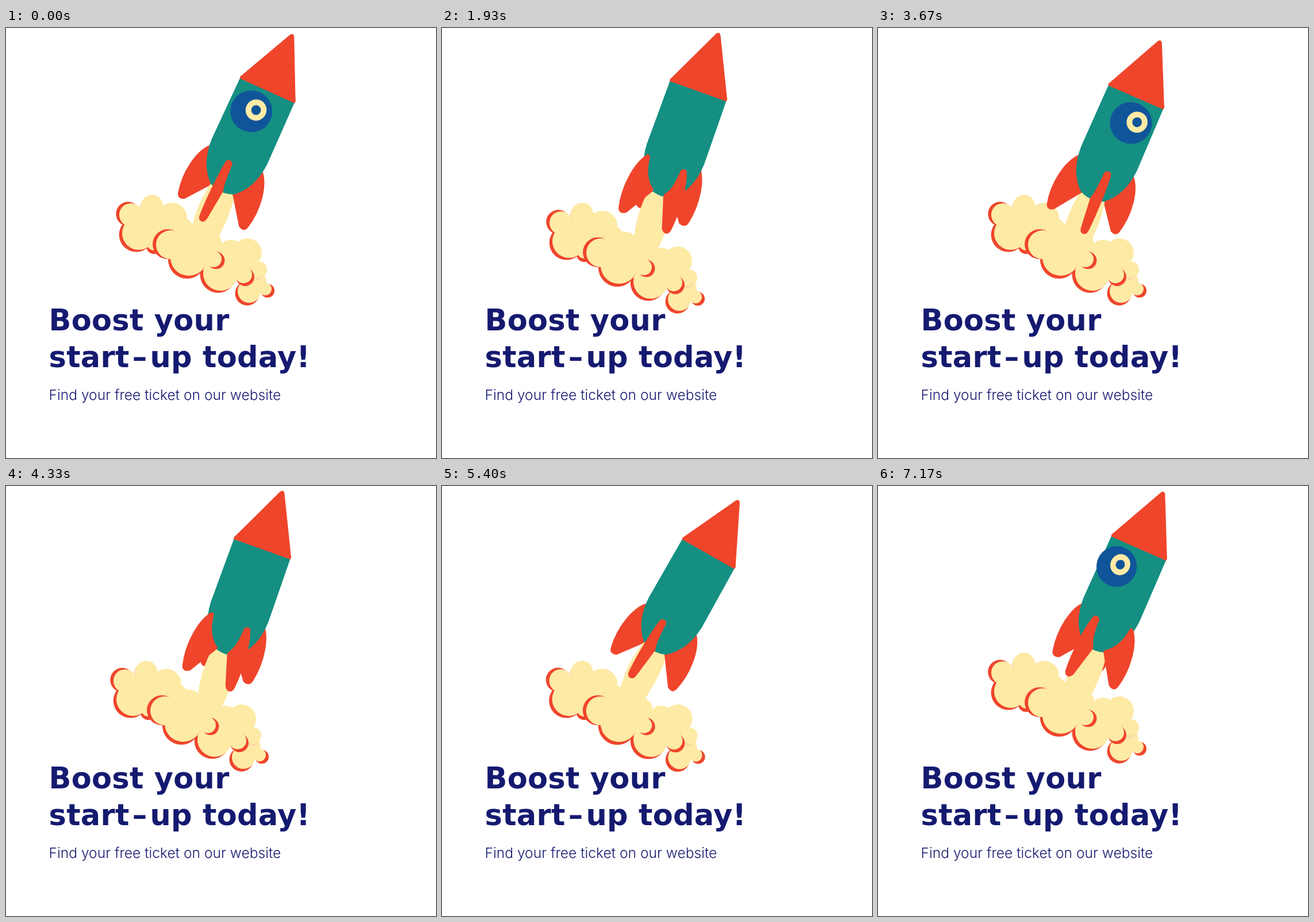
These frames come from a looping animation (748 by 748 pixels, 7210 ms). An HTML page with a canvas:

```html
<!DOCTYPE html>
<html lang="en">
<head>
<meta charset="utf-8">
<title>Boost your start-up today!</title>
<style>
  html, body { margin: 0; width: 100%; height: 100%; overflow: hidden; background: #fff; }
  canvas { position: absolute; left: 0; top: 0; width: 748px; height: 748px; }
  p { position: absolute; margin: 0; left: 74.5px; line-height: 64px; white-space: pre; color: #151a70; }
  .head { font: 700 51px/64px "DejaVu Sans", sans-serif; letter-spacing: 0.3px; }
  .one { top: 477px; }
  .two { top: 541px; }
  .dash { margin: 0 5px; }
  .sub { top: 606px; font: 300 24.6px/64px Inter, "Liberation Sans", sans-serif; }
</style>
</head>
<body>
<canvas width="748" height="748"></canvas>
<p class="head one">Boost your</p>
<p class="head two">start<span class="dash">–</span>up today!</p>
<p class="sub">Find your free ticket on our website</p>
<script>
const ctx = document.querySelector('canvas').getContext('2d');
const RED = '#ef452b', TEAL = '#148f82', BLUE = '#10559a', CREAM = '#fdeaa5', PEACH = '#fbdca6';
const CYCLE = 7210 / 3;
const { sin, cos, PI } = Math;
const rad = deg => deg * PI / 180;

// Lobes of each cloud as x, y, radius; clouds run from back to front.
const clouds = [
  [[413, 472, 20], [441, 468, 11], [425, 454, 18], [428, 436, 14]],
  [[221, 371, 29], [207, 339, 20], [248, 388, 13], [244, 323, 19],
   [279, 344, 26], [254, 352, 32], [298, 362, 17]],
  [[363, 441, 30], [403, 443, 15], [410, 405, 25], [381, 402, 20],
   [392, 422, 24], [430, 434, 14], [346, 422, 18]],
  [[276, 391, 25], [308, 413, 32], [351, 416, 14], [316, 386, 32], [342, 390, 24]]
].map(lobes => {
  const mean = i => lobes.reduce((sum, l) => sum + l[i], 0) / lobes.length;
  const cx = mean(0), cy = mean(1);
  const isRim = ([x, y]) => y - cy > 0.4 * (x - cx);
  return { cx, cy, rim: lobes.filter(isRim), plain: lobes.filter(l => !isRim(l)) };
});

function oval(x, y, rx, ry, color) {
  ctx.beginPath();
  ctx.ellipse(x, y, rx, ry, 0, 0, 7);
  ctx.fillStyle = color;
  ctx.fill();
}

function fill(color, path) {
  ctx.fillStyle = ctx.strokeStyle = color;
  ctx.fill(path);
}

// p runs from 0 to 1 twice per cycle.
function drawClouds(p) {
  const lift = Math.min(1, Math.max(0, 0.5 - 0.9 * cos(2 * PI * (p - 0.46))));
  const rise = lift * lift * (3 - 2 * lift);
  const swell = 1 + 0.1 * Math.exp(-(((p - 0.36) / 0.075) ** 2));
  ctx.save();
  ctx.translate(315 + 10 * rise, 385 - 14 * rise);
  ctx.scale(swell, swell);
  ctx.translate(-315, -385);
  for (const { cx, cy, rim, plain } of clouds) {
    for (const [x, y, r] of plain) {
      oval(x - 2, y + 3, r, r, PEACH);
      oval(x, y, r, r, CREAM);
    }
    for (const [x, y, r] of rim) {
      const far = Math.hypot(x - cx, y - cy);
      oval(x + 5 * (x - cx) / far, y + 5 * (y - cy) / far, r + 1, r + 1, RED);
    }
    for (const [x, y, r] of rim) oval(x, y, r, r, CREAM);
  }
  ctx.restore();
}

// A flat fin seen at an angle around the rocket's axis, slightly from below.
function drawFin(angle) {
  const s = sin(angle), c = cos(angle);
  const pt = (r, z) => [r * s, z + 0.25 * r * c];
  const p = new Path2D();
  p.moveTo(...pt(50, 133));
  p.bezierCurveTo(...pt(68, 152), ...pt(75, 195), ...pt(66, 230));
  p.quadraticCurveTo(...pt(64, 237), ...pt(56, 233));
  p.lineTo(...pt(22, 188));
  p.quadraticCurveTo(...pt(46, 170), ...pt(50, 133));
  p.closePath();
  fill(RED, p);
  ctx.lineJoin = 'round';
  ctx.lineWidth = 4 + 9 * Math.abs(c);
  ctx.stroke(p);
}

function drawPorthole(spin) {
  const s = sin(spin), c = cos(spin);
  if (c < -0.15) return;
  ctx.save();
  oval(60 * s, 46, 37 * (0.28 + 0.72 * c), 37 - 4 * Math.abs(s), BLUE);
  ctx.clip();
  if (c > 0.3) {
    const x = 8 * c + 68 * s;
    oval(x, 40.5, 18.5 * c, 18.5, CREAM);
    oval(x, 40.5, 8.5 * c, 8.5, BLUE);
  }
  ctx.restore();
}

const plume = new Path2D('M-22 186C-28 225-28 262-10 305L24 305C30 262 32 225 22 186Z');
const hull = new Path2D('M-52 0L-53 118Q-51 165-22 190Q0 200 22 190Q51 165 53 118L52 0Z');
const nose = new Path2D('M-52 2Q-54-1-51-5L-4-103Q0-109 4-103L51-5Q54-1 52 2Q0 2-52 2Z');

function draw(u) {
  const a = 2 * PI * u;
  const x = 453.6 + 9.5 * sin(a) + 2.2 * cos(a) - 0.8 * cos(2 * a);
  const y = 113.5 + 3.5 * sin(a) - 6.2 * cos(a);
  const tilt = rad(24.4 + 5 * sin(a));
  const spin = 2 * a - rad(10);
  const fins = [0, 1, 2, 3].map(i => spin + i * PI / 2);
  const finsWithin = (min, max) =>
    fins.filter(f => cos(f) >= min && cos(f) < max).forEach(drawFin);
  const onRocket = paint => {
    ctx.save();
    ctx.translate(x, y);
    ctx.rotate(tilt);
    paint();
    ctx.restore();
  };

  ctx.clearRect(0, 0, 748, 748);
  onRocket(() => {
    finsWithin(-2, 0);
    fill(CREAM, plume);
  });
  drawClouds(2 * u % 1);
  onRocket(() => {
    finsWithin(0, 0.3);
    fill(TEAL, hull);
    fill(RED, nose);
    drawPorthole(spin);
    finsWithin(0.3, 2);
  });
}

const start = performance.now();
function tick() {
  draw((performance.now() - start) / CYCLE % 1);
  requestAnimationFrame(tick);
}
tick();
</script>
</body>
</html>
```
